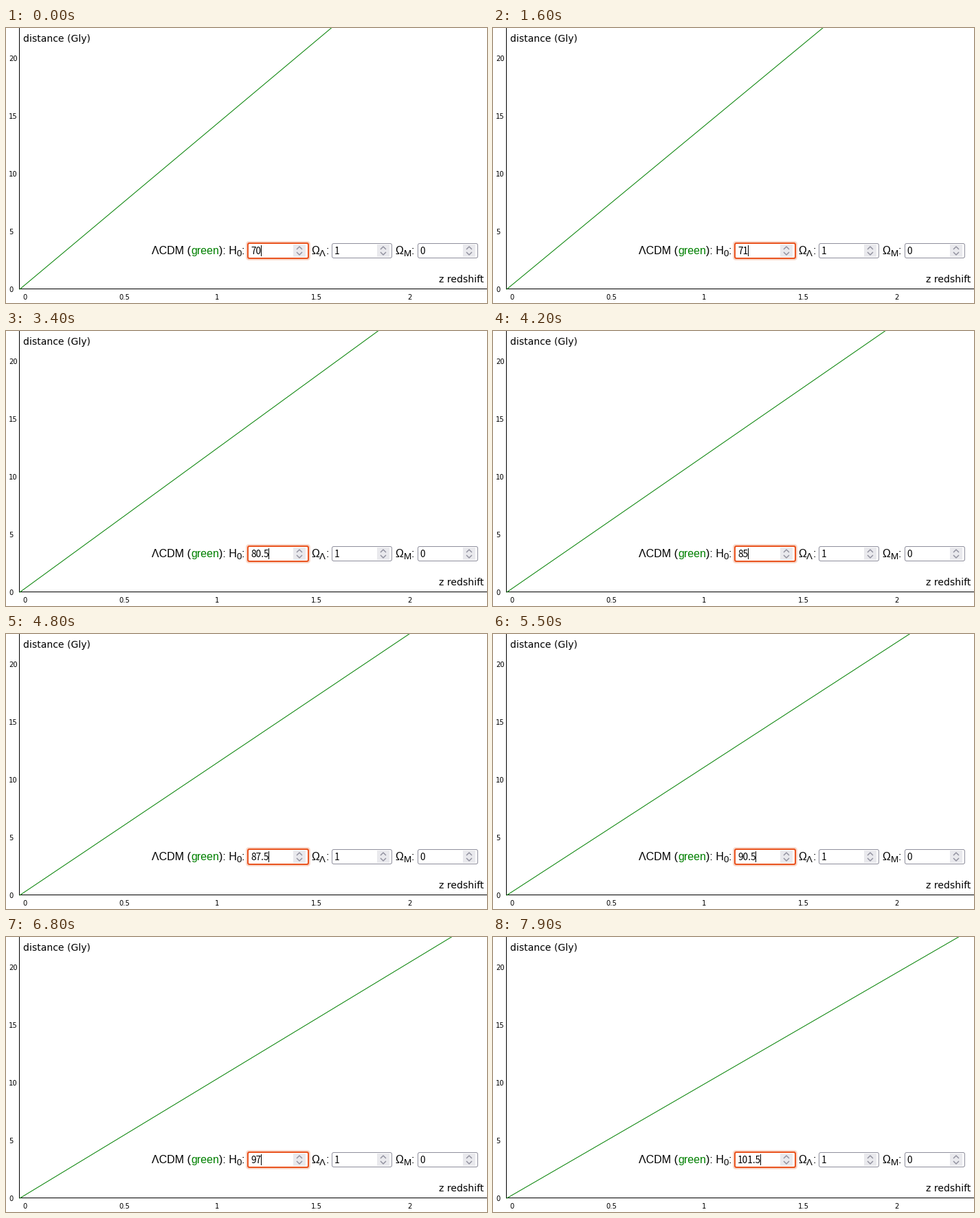
A matplotlib script for the animation above (8000 ms loop, 700x400 px).

```python
import math

import matplotlib.pyplot as plt
from matplotlib.animation import FuncAnimation
from matplotlib.patches import FancyBboxPatch, Rectangle

WIDTH, HEIGHT, DPI = 700, 400, 100
PX = 72 / DPI  # points per pixel

FRAMES, INTERVAL = 80, 100
ORIGIN_X, ORIGIN_Y = 20, 380
X_SCALE, Y_SCALE = 280, 16.8   # pixels per unit redshift, pixels per Gly
HUBBLE_LENGTH = 977.8          # c / H0 in Gly, for H0 = 1 km/s/Mpc

H0_START, H0_STEP = 70, 0.5
FIRST_STEP, REPEAT_START = 10, 16
HELD = (43, 49, 60, 69, 74)    # key repeats that arrive late
DOUBLED = (25, 38, 57)         # two key repeats at once
CARET_OFF = range(12, 16)

BORDER, BUTTON, ACCENT = "#8f8f9d", "#e9e9ed", "#e95420"
UI, PLOT, FIELD = "Liberation Sans", "DejaVu Sans", "Noto Sans CJK JP"
FIELD_SIZE = 13.7

fig = plt.figure(figsize=(WIDTH / DPI, HEIGHT / DPI), dpi=DPI, facecolor="white")
ax = fig.add_axes([0, 0, 1, 1])
ax.set_xlim(0, WIDTH)
ax.set_ylim(HEIGHT, 0)
ax.axis("off")


def label(x, baseline, text, size, font=PLOT, color="black"):
    return ax.text(x, baseline, text, fontsize=size * PX, family=font,
                   color=color, ha="left", va="baseline", zorder=5)


def rect(x0, y0, x1, y1, color, zorder=1):
    patch = Rectangle((x0, y0), x1 - x0, y1 - y0, fc=color, ec="none",
                      lw=0, zorder=zorder)
    return ax.add_patch(patch)


def rounded(x0, y0, x1, y1, radius, color):
    style = f"round,pad=0,rounding_size={radius}"
    ax.add_patch(FancyBboxPatch((x0, y0), x1 - x0, y1 - y0, boxstyle=style,
                                fc=color, ec="none", lw=0, zorder=2, snap=False))


def number_field(x, focused=False):
    """An 88 x 22 input with its up and down buttons."""
    layers = [(0, 3, BORDER), (-1, 2, "white")]
    if focused:
        layers = [(3, 5, "#f8d9cc"), (1, 3, ACCENT), (-1, 1.5, "white")]
    for grow, radius, color in layers:
        rounded(x - grow, 313 - grow, x + 88 + grow, 335 + grow, radius, color)
    rect(x + 66, 315, x + 84, 333, BUTTON, zorder=3)
    middle = x + 75
    for edge, tip in ((321.5, 318), (326.5, 330)):
        ax.plot([middle - 3.5, middle, middle + 3.5], [edge, tip, edge],
                color=BORDER, lw=1.4 * PX, zorder=4, snap=False)


def symbol(x, letter, sub, width):
    """A letter with a subscript and a colon."""
    label(x, 329, letter, 16, UI)
    label(x + 12, 332, sub, 13.33, UI)
    label(x + 12 + width, 329, ":", 16, UI)


def hubble(frame):
    steps = int(frame >= FIRST_STEP) + max(0, frame - REPEAT_START + 1)
    steps += sum(frame >= f for f in DOUBLED) - sum(frame >= f for f in HELD)
    return H0_START + H0_STEP * steps


# Axes
rect(19, 0, 20, 380, "black")
rect(19, 379, WIDTH, 380, "black")
label(25, 20, "distance (Gly)", 14)
label(630.5, 370, "z redshift", 14)
for gly in range(0, 25, 5):
    label(4, ORIGIN_Y + 4 - gly * Y_SCALE, str(gly), 10)
for half in range(5):
    label(ORIGIN_X + 4 + half * X_SCALE / 2, 395, f"{half / 2:g}", 10)

# Form
label(212, 329, "ΛCDM (", 16, UI)
label(269, 329, "green", 16, UI, "green")
label(309.8, 329, "): H", 16, UI)
label(335.6, 332, "0", 13.33, UI)
label(343, 329, ":", 16, UI)
symbol(444.4, "Ω", "Λ", 8.9)
symbol(566.7, "Ω", "M", 11.1)
number_field(352, focused=True)
number_field(474)
number_field(599)
label(478, 329, "1", FIELD_SIZE, FIELD)
label(602.7, 329, "0", FIELD_SIZE, FIELD)

# Moving parts
entry = label(355.9, 329, "", FIELD_SIZE, FIELD)
caret = rect(371, 316, 372, 332, "black", zorder=6)
curve, = ax.plot([], [], color="green", lw=PX, zorder=1.5, snap=False)


def update(frame):
    h0 = hubble(frame)
    text = f"{h0:g}"
    entry.set_text(text)
    dots = text.count(".")
    caret.set_x(math.floor(355.9 + 7.627 * (len(text) - dots) + 3.57 * dots))
    caret.set_visible(frame not in CARET_OFF)

    z_end = 2.6
    distance = HUBBLE_LENGTH * z_end / h0
    curve.set_data([ORIGIN_X, ORIGIN_X + z_end * X_SCALE],
                   [ORIGIN_Y, ORIGIN_Y - distance * Y_SCALE])
    return entry, caret, curve


animation = FuncAnimation(fig, update, frames=FRAMES, interval=INTERVAL,
                          repeat=True, repeat_delay=0, blit=False)
plt.show()
```
